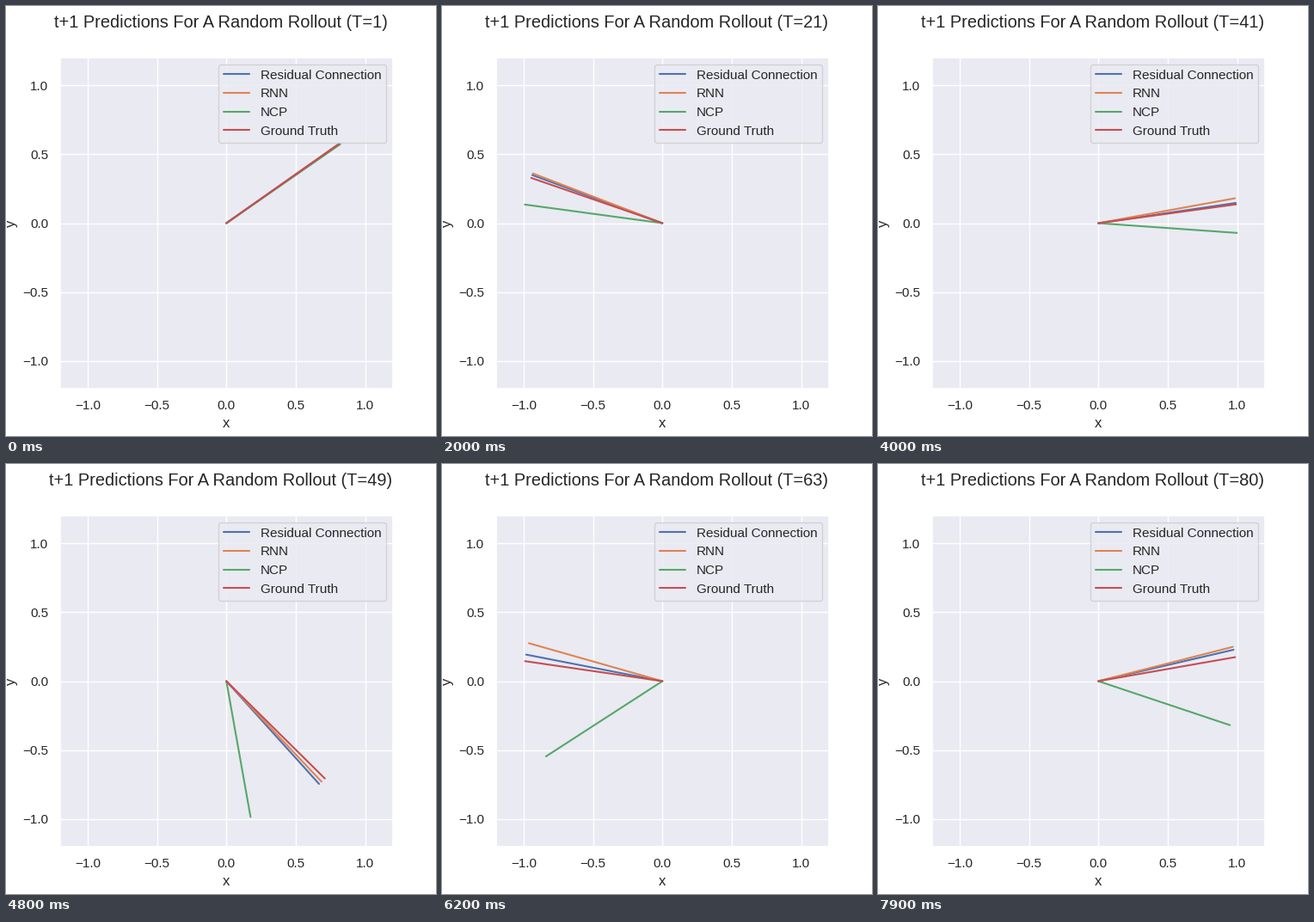
These frames come from a looping animation (500 by 500 pixels, 8000 ms). A matplotlib script:

```python
import matplotlib.pyplot as plt
import numpy as np
from matplotlib.animation import FuncAnimation

STEPS = 80
INK = "#262626"

# Turning points of each swing: (step, degrees from straight down, right positive)
SERIES = [
    ("Residual Connection", "#4C72B0",
     [(1, 125.3), (22.1, -112), (42.1, 100), (61.4, -105), (79.7, 103.3), (98, -105)]),
    ("RNN", "#DD8452",
     [(1, 125.3), (22.2, -113), (42.1, 102), (61.6, -109), (80, 104.4), (98, -109)]),
    ("NCP", "#55A868",
     [(1, 124.9), (22, -99), (40.8, 86), (58.2, -81), (77.2, 80), (96, -80)]),
    ("Ground Truth", "#C44E52",
     [(1, 125.3), (22.2, -111), (42.3, 100), (61.5, -102), (79, 101.4), (98, -102)]),
]

plt.rcParams.update({
    "font.family": "Liberation Sans",
    "font.size": 12,
    "text.color": INK,
    "axes.facecolor": "#EAEAF2",
    "axes.edgecolor": "white",
    "axes.labelcolor": INK,
    "axes.linewidth": 1.25,
    "axes.axisbelow": True,
    "axes.grid": True,
    "axes.labelsize": 12,
    "grid.color": "white",
    "grid.linewidth": 1,
    "lines.linewidth": 1.5,
    "lines.solid_capstyle": "round",
    "legend.fontsize": 11,
    "figure.titlesize": 14.4,
    "xtick.bottom": False,
    "ytick.left": False,
})
for axis in ("xtick", "ytick"):
    plt.rcParams.update({
        f"{axis}.color": INK,
        f"{axis}.labelsize": 11,
        f"{axis}.major.size": 6,
    })


def swing_angle(turns, t):
    """Ease from one turning point to the next along a half cosine."""
    for (t0, a0), (t1, a1) in zip(turns, turns[1:]):
        if t <= t1:
            ease = (1 - np.cos(np.pi * (t - t0) / (t1 - t0))) / 2
            return np.radians(a0 + (a1 - a0) * ease)


fig, ax = plt.subplots(figsize=(5, 5), dpi=100)
fig.subplots_adjust(left=0.125, right=0.9, bottom=0.11, top=0.88)
ticks = np.linspace(-1, 1, 5)
ax.set(xlim=(-1.2, 1.2), ylim=(-1.2, 1.2), xticks=ticks, yticks=ticks,
       xlabel="x", ylabel="y")
title = fig.suptitle("")
rods = [ax.plot([], [], color=color, label=label)[0] for label, color, _ in SERIES]
ax.legend(loc="upper right", framealpha=0.8, edgecolor="0.8")


def draw(i):
    t = i + 1
    title.set_text(f"t+1 Predictions For A Random Rollout (T={t})")
    for rod, (_, _, turns) in zip(rods, SERIES):
        a = swing_angle(turns, t)
        rod.set_data([0, np.sin(a)], [0, -np.cos(a)])
    return [title, *rods]


anim = FuncAnimation(fig, draw, frames=STEPS, interval=100, repeat=True,
                     repeat_delay=0, blit=False)
plt.show()
```
